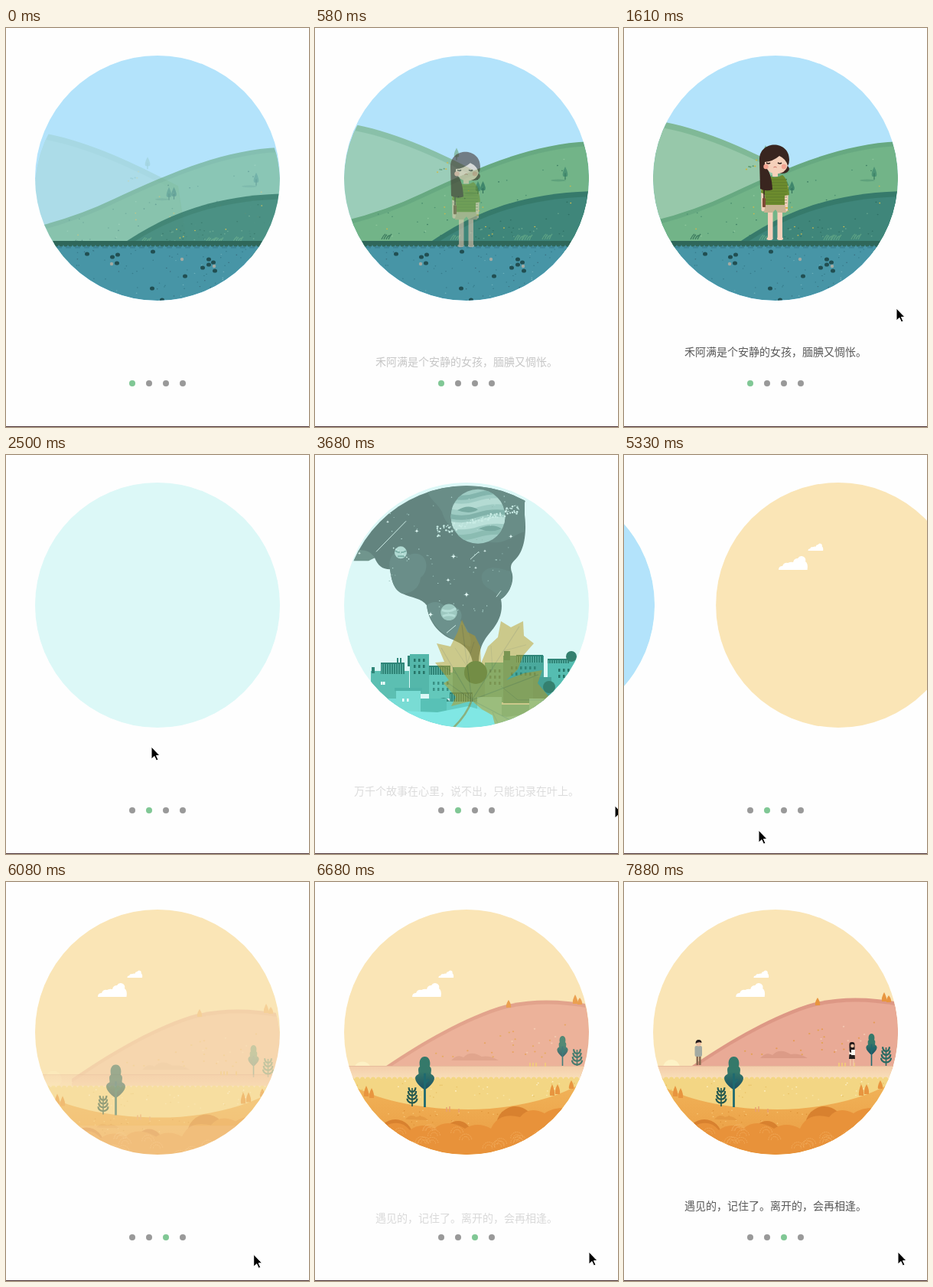
An HTML page that plays this animation: 396x521 px, repeating every 8000 ms.

```html
<!DOCTYPE html>
<html lang="zh">
<head>
<meta charset="utf-8">
<title>Onboarding</title>
<style>
html, body { margin: 0; width: 100%; height: 100%; overflow: hidden; background: #fefefe; }
svg { display: block; width: 396px; height: 521px; }
text { font: 14px "Noto Sans CJK SC", "Noto Sans CJK", sans-serif; fill: #585858; }
</style>
</head>
<body>
<svg id="stage" viewBox="0 0 396 521">
  <defs>
    <clipPath id="disc"><circle cx="198" cy="196" r="160"/></clipPath>
    <clipPath id="globe"><circle cx="213" cy="76" r="35.5"/></clipPath>
    <linearGradient id="crown" x1="0" y1="0" x2="0" y2="1">
      <stop offset=".45" stop-color="#35796a"/><stop offset="1" stop-color="#1b4f64"/>
    </linearGradient>
    <linearGradient id="sand" x1="0" y1="0" x2="0" y2="1">
      <stop offset="0" stop-color="#f3cdaa"/><stop offset="1" stop-color="#fae2bc"/>
    </linearGradient>
    <linearGradient id="soil" x1="0" y1="0" x2="0" y2="1">
      <stop offset="0" stop-color="#f2b65c"/><stop offset="1" stop-color="#e99a40"/>
    </linearGradient>
  </defs>
</svg>
<script>
const LOOP = 8000, GAP = 400;
const stage = document.getElementById('stage');
const clamp = v => Math.max(0, Math.min(1, v));
let seed = 7;
const rnd = () => (seed = seed * 16807 % 2147483647) / 2147483647;
const pick = list => list[Math.floor(rnd() * list.length)];

// Drawing helpers, each returns markup
const path = (d, fill, more = '') => `<path d="${d}" fill="${fill}" ${more}/>`;
const line = (d, color, w = 1, more = '') => path(d, 'none', `stroke="${color}" stroke-width="${w}" ${more}`);
const rect = (x, y, w, h, fill, r = 0) => `<rect x="${x}" y="${y}" width="${w}" height="${h}" rx="${r}" fill="${fill}"/>`;
const oval = (x, y, rx, ry, fill, more = '') => `<ellipse cx="${x}" cy="${y}" rx="${rx}" ry="${ry}" fill="${fill}" ${more}/>`;
const dot = (x, y, r, fill) => oval(x, y, r, r, fill);
const many = (n, fn) => Array.from({ length: n }, (_, i) => fn(i)).join('');
const each = (list, fn) => list.map(fn).join('');
const hill = (d, edge, body, dy) => path(d, edge) + path(d, body, `transform="translate(0 ${dy})"`);

function specks(n, x0, x1, top, bottom, colors, r = .8) {
  return many(n, () => {
    const x = x0 + rnd() * (x1 - x0), y0 = top(x);
    return oval(x.toFixed(1), (y0 + rnd() * (bottom - y0)).toFixed(1), r * 1.2, r, pick(colors));
  });
}
const pine = (x, y, h, c, trunk) =>
  path(`M${x} ${y - h}Q${x + 5} ${y - h * .4} ${x + 2.5} ${y - 4}H${x - 2.5}Q${x - 5} ${y - h * .4} ${x} ${y - h}Z`, c) +
  line(`M${x} ${y - h * .5}V${y}`, trunk, 1.2);
const grass = (x, y, c) => many(4, i => line(`M${x + i * 3 - 5} ${y + 5}q2 -5 ${5 - i % 2} ${-7 + i % 3}`, c, 1.4));
const flame = (x, y, h) => path(`M${x} ${y - h}q4 ${h * .6} 3 ${h}h-6q-1 ${-h * .4} 3 ${-h}Z`, '#e8953f');
const fern = (x, y, h, c) => line(`M${x} ${y}V${y - h}`, c, 1.6) +
  many(4, i => {
    const b = y - h * (.18 + i * .2), w = 6.5 - i * .7;
    return line(`M${x} ${b}q${-w} -1 ${-w} -6M${x} ${b}q${w} -1 ${w} -6`, c, 2.2);
  });
const leafTree = (x, y, h, w) => {
  const c = y - h, b = h * .66;
  return path(`M${x} ${c}C${x + w * .5} ${c} ${x + w * .55} ${c + b * .2} ${x + w * .45} ${c + b * .3}` +
    `C${x + w * .75} ${c + b * .35} ${x + w * .5} ${c + b * .5} ${x + w * .6} ${c + b * .53}` +
    `C${x + w * 1.25} ${c + b * .62} ${x + w * .7} ${c + b * .85} ${x} ${c + b}` +
    `C${x - w * .7} ${c + b * .85} ${x - w * 1.25} ${c + b * .62} ${x - w * .6} ${c + b * .53}` +
    `C${x - w * .5} ${c + b * .5} ${x - w * .75} ${c + b * .35} ${x - w * .45} ${c + b * .3}` +
    `C${x - w * .55} ${c + b * .2} ${x - w * .5} ${c} ${x} ${c}Z`, 'url(#crown)') +
    line(`M${x} ${y}V${c + b * .5}M${x} ${c + b * .8}l5 -5`, '#1f6a70', w * .2);
};
const star = (x, y, r) => path(`M${x} ${y - r}Q${x} ${y} ${x + r} ${y}Q${x} ${y} ${x} ${y + r}Q${x} ${y} ${x - r} ${y}Q${x} ${y} ${x} ${y - r}Z`, '#e4fbf6');

// Page 1: meadow
const meadowBack = () =>
  hill('M30 119Q44 120 54 123C110 134 165 160 225 191L240 290H30Z', '#80b997', '#97c8aa', 8) +
  pine(185, 169, 16, '#7fb59a', '#6ca287') +
  specks(6, 160, 176, () => 168, 186, ['#c9b63f', '#5e9a72'], 1);

const meadowMid = () =>
  hill('M30 254Q90 240 140 216C220 179 290 149 365 148V290H30Z', '#67a981', '#72b488', 6) +
  oval(204, 216, 9, 1.5, '#5fa27c') + oval(318, 199, 10, 1.5, '#5fa27c') +
  pine(213, 217, 17, '#468f72', '#35745e') + pine(219.5, 216, 16, '#3f866c', '#35745e') +
  pine(327, 198, 17, '#4c9475', '#387a60') +
  specks(55, 80, 350, x => 240 - (x - 60) * .28, 272, ['#4f9372', '#8dc79b', '#4f9372', '#c9b84f', '#3f7f64']) +
  grass(92, 271, '#3f7d60');

const meadowFront = () =>
  hill('M150 280C200 246 262 215 365 213V290H150Z', '#367a6b', '#3f867a', 7) +
  specks(40, 200, 335, x => 268 - (x - 190) * .3, 276, ['#2f7064', '#d0bd4e', '#65a58f', '#2f7064']) +
  each([[182, 272], [266, 272], [276, 272], [302, 271]], ([x, y]) => grass(x, y, '#5ba084'));

const pond = () =>
  rect(30, 282, 340, 80, '#4795a6') +
  rect(30, 278, 340, 5.5, '#2f675a') +
  many(56, i => dot(36 + i * 6, 283, 2.6, '#2f675a')) +
  line('M30 286.5H370', '#3d8394', 2, 'stroke-dasharray="7 5"') +
  specks(90, 60, 335, () => 289, 352, ['#367c8c', '#3a6f80', '#367c8c', '#6db0bb'], .7) +
  each([[106, 295], [192, 292], [139, 299], [146, 296], [145, 307], [234, 324], [191, 340], [265, 302],
    [271, 306], [265, 309], [257, 313], [273, 317], [204, 355]], ([x, y]) => oval(x, y, 3, 2.6, '#214f52')) +
  each([[138, 308], [272, 311], [230, 302]], ([x, y]) => dot(x, y, 2.2, '#a3aaa2'));

const SKIN = '#f5d0ba', HAIR = '#39251f';
const girl = () =>
  oval(207, 184, 9, 6, HAIR) +
  rect(188, 236, 6.5, 39, SKIN) + rect(200.5, 236, 6.5, 39, SKIN) +
  oval(190.5, 275, 4, 2, SKIN) + oval(204, 275, 4, 2, SKIN) +
  path('M179 206h6l.5 30q-3 6 -6 2Z', SKIN) + path('M209 206h6l-1 32q-3 4 -5 0Z', SKIN) +
  rect(209, 234, 5, 1.8, '#dcb13f') +
  path('M185 228h25l2 13h-11l-3 -4 -4 4h-11Z', '#c9b493') +
  path('M187 192Q197 198 207 192Q214 196 216 218L210 219 210 231H185L184 217 179 215Q180 198 187 192Z', '#6d8c2e') +
  many(9, i => line(`M182 ${198 + i * 3.8}H213`, '#58742a', 1, 'opacity=".6"')) +
  rect(194, 187, 7, 7, SKIN) +
  path('M183 170Q184 190 199 190.500Q215 190 215 171Q200 158 183 170Z', SKIN) +
  path('M177 172C177 146 216 146 216 172Q216 177 214 180Q212 171 203 167Q195 174 184 175L184 181Q193 188 194 211Q186 214 178 210Z', HAIR) +
  line('M186 176q3 2 5 0M201 176q3 2 5 0', '#2b1a16', 1.6) +
  dot(185.500, 181, 3.2, '#f2a391') + dot(209, 181, 3.2, '#f2a391') +
  line('M195.500 182q2 -1.500 4 0', '#c4665a', 1) +
  line('M183 210V222', HAIR, 1.5) + rect(181, 222, 4, 12, '#7c4a35', 1);

// Page 2: city under a starry plume
const plume = () =>
  path('M30 129C48 134 64 135 78 130C82 140 88 145 98 145C100 158 102 172 115 177C125 182 140 183 146 192' +
    'C148 212 160 228 178 236C195 243 205 250 207 274H214C213 252 218 240 230 226C242 212 246 198 243 184' +
    'C252 178 260 165 258 152C256 145 254 140 260 134C272 124 275 105 275 90C275 75 273 65 270 58L292 45V20H30Z', '#41645e') +
  path('M98 145C94 128 108 112 124 126C146 118 152 146 138 156C136 172 124 176 115 177C102 172 100 158 98 145Z', '#4a716a') +
  path('M150 20C136 48 160 56 166 70C172 92 196 110 222 108C246 116 262 98 274 96V58L285 30Z', '#496f68') +
  path('M146 192C156 184 168 188 172 198C184 188 196 200 190 212C200 222 206 236 203 246C180 238 150 224 146 192Z', '#4d756e') +
  path('M78 130C70 116 56 122 50 118V134H70Z', '#52796f') +
  path('M243 184C234 168 216 172 218 152C226 136 246 146 257 148C260 165 252 178 243 184Z', '#466c65') +
  `<g clip-path="url(#globe)">` + rect(170, 36, 90, 82, '#8dbfb4') +
  each([[48, 6, '#6aa398'], [60, 8, '#a9d3c9'], [74, 6, '#689f94'], [85, 9, '#b2dad1'], [100, 7, '#75ab9f']], ([y, w, c]) =>
    line(`M170 ${y}q22 7 42 0t48 -2`, c, w)) +
  path('M186 68q14 -9 27 -1q-10 7 -27 1ZM214 92q18 -8 30 0q-14 6 -30 0Z', '#5c9489') + '</g>' +
  many(120, () => {
    const a = rnd() * 2 - 1, s = (rnd() - .5) * (5 + Math.abs(a) * 9);
    return dot((213 + a * 54).toFixed(1), (81 - a * 15 + s).toFixed(1), (.5 + rnd() * .9).toFixed(1), '#c3e9e0');
  }) +
  dot(112, 123, 8, '#a5d2c8') + line('M105 121q7 4 14 0M108 128h9', '#629c91', 2) +
  line('M102 117q12 6 22 16', '#c3e9e0', 1.5, 'stroke-dasharray="1.5 2"') +
  dot(175, 201, 10.800, '#8bbbb0') + line('M166 198q9 4 18 -2M167 206q8 -3 16 0', '#a9d5cc', 3) +
  each([[95, 83], [133, 95], [181, 128], [222, 121], [174, 159], [151, 204], [210, 143], [256, 102], [198, 178], [58, 124]],
    ([x, y], i) => star(x, y, 2 + i % 3)) +
  specks(60, 95, 255, () => 45, 165, ['#a9d5cc', '#7fa9a0'], .6) +
  specks(12, 152, 236, () => 175, 222, ['#a9d5cc'], .6) +
  line('M80 122L119 82M203 132L214 122M172 228L184 218M237 181L243 173', '#c8e8e0', 1);

const block = ([x, y, w, h, c]) => rect(x, y, w, h, c);
const roof = ([x, y, w, h]) => rect(x, y, w, h, '#2f8578') +
  many(Math.floor(w / 3), i => rect(x + 1 + i * 3, y + 2, 1, h - 2, '#5fb9ab'));
const panes = ([x, y, cols, rows, c]) =>
  many(cols * rows, i => rect(x + i % cols * 6, y + Math.floor(i / cols) * 8, 2.5, 4, c));
const city = () =>
  each([[73, 282, 50, 45, '#5cbfb2'], [74, 277, 4, 8, '#2f8578'], [124, 260, 25, 52, '#54b7aa'], [121, 262, 3, 14, '#2f8578'],
    [107, 265, 2, 9, '#2f8578'], [111, 265, 2, 9, '#2f8578'], [149, 284, 33, 34, '#63c8bb'], [180, 277, 50, 50, '#4fb0a3'],
    [222, 271, 26, 52, '#58bdae'], [246, 262, 53, 62, '#4aa99d'], [247, 256, 8, 12, '#3a9185'], [304, 266, 46, 60, '#55bdb1'],
    [285, 290, 24, 50, '#45a196']], block) +
  each([[86, 271, 31, 15], [149, 275, 28, 12], [263, 261, 35, 10], [304, 266, 28, 6], [176, 310, 30, 13]], roof) +
  dot(335, 263, 7, '#34806f') + dot(306, 303, 8, '#34806f') + dot(210, 284, 15, '#2b8069') + dot(168, 326, 9, '#3b8e80') +
  each([[129, 266, 3, 3, '#277568'], [154, 296, 4, 2, '#3a9185'], [228, 280, 3, 3, '#3a9185'], [256, 276, 6, 2, '#2f8578'],
    [318, 279, 4, 2, '#277568'], [86, 296, 1, 1, '#f0fffd'], [89, 296, 1, 1, '#f0fffd']], panes) +
  each([[106, 307, 32, 50, '#79dcd4'], [138, 318, 34, 40, '#58c1b6'], [70, 318, 36, 40, '#76dcd7'], [172, 322, 40, 40, '#64cdc4'],
    [212, 316, 32, 40, '#7be0da'], [244, 326, 36, 30, '#64cdc4'], [280, 318, 44, 40, '#7fe4df']], block) +
  rect(104, 304, 36, 4, '#4fb3a8') +
  each([[114, 318, 2, 1, '#f0fffd'], [294, 326, 3, 1, '#eafffc']], panes) +
  path('M60 326L110 334L160 336L200 328L250 342L340 330V360H60Z', '#80e7e4');

const leaf = () =>
  path('M205 311L178 318L184 306L168 288L175 284L157 261L169 260L159 236L177 240L186 222L192 205L199 221L209 226L216 240' +
    'L217 262L226 240L239 228L243 207L256 215L272 207L273 226L286 236L272 252L265 270L250 284L273 275L297 271L291 288' +
    'L312 313L296 318L304 338L283 336L270 348L255 338L236 346L232 330L218 322Z', '#ba9a22') +
  line('M205 310Q197 334 171 355', '#957d1c', 2.6) +
  each(['M192 212', 'M165 242', 'M267 214', 'M292 277', 'M268 343', 'M174 288'], d => line(d + 'L205 310', '#957d1c', 1.1)) +
  line('M200 268l-17 -26M199 262l9 -28M232 271l-2 -32M246 246l30 -8M243 292l22 18l34 0M232 326l7 14M185 276l-22 -12', '#957d1c', .8);

// Page 3: autumn shore
const CLOUD = 'M0 19Q0 14 5 14 7 9 12 10 16 8 19 9 20 4 25 4 28 -1 33 2 36 4 35 8 39 11 37.500 19Z';
const sun = () => dot(62, 243, 11, '#fdf2c6');
const pinkHill = () =>
  hill('M86 242C130 212 185 178 240 160C280 148 325 150 365 158V246H86Z', '#dd9885', '#e9aa96', 5) +
  path('M178 230q8 -9 16 -4q9 -10 24 -1q10 -2 22 5Z', '#dc9b87') +
  specks(26, 155, 330, x => 228 - (x - 130) * .28, 226, ['#e59a55', '#e3a255', '#f3c6b0'], 1) +
  flame(253, 161, 10) + flame(340, 156, 12) + flame(346, 157, 9) +
  leafTree(323.500, 240, 42, 8) + fern(342.500, 240, 24, '#2a6a62');

const field = () =>
  rect(30, 240, 340, 20, 'url(#sand)') + rect(30, 257, 340, 50, '#f3d684') +
  many(50, i => dot(34 + i * 7, 257.500, 3, '#f3d684')) +
  line('M30 240.500H370', '#e7bd9d', 1) +
  specks(45, 50, 345, () => 260, 286, ['#f9e6a8', '#e9c469', '#fff1c8'], .8) +
  many(4, i => line(`M${281 + i * 4 + (i > 2 ? 8 : 0)} 241v-5`, '#f3cf78', 1.6));

const shore = () =>
  path('M30 254C70 284 135 297 200 297C265 297 330 280 368 250V360H30Z', 'url(#soil)') +
  each([[67, 280, 14], [74, 282, 13], [310, 279, 15], [317, 277, 13], [335, 270, 11]], a => flame(...a)) +
  specks(50, 90, 320, () => 298, 318, ['#f8c878', '#dd9036'], .7) +
  path('M118 310q7 -8 14 -3q9 -3 16 4Z', '#e59a43') +
  each([[105, 333, 23], [187, 329, 17], [262, 318, 25]], ([x, y, r]) => dot(x, y, r, '#d8812f')) +
  path('M60 324Q74 310 92 318Q112 309 124 324Q138 313 156 322Q172 308 196 322Q212 312 230 322Q240 300 268 307' +
    'Q280 292 300 302Q318 290 350 298V360H60Z', '#e8923a') +
  many(24, () => {
    const x = 90 + rnd() * 215, y = 324 + rnd() * 24;
    return line(`M${x - 8} ${y}a8 8 0 0 1 16 0M${x - 4.500} ${y}a4.500 4.500 0 0 1 9 0`, '#f3b264', .8, 'stroke-dasharray="1.500 1"');
  }) +
  line('M172 300v-6M176 300v-7M188 301v-5', '#e8a070', 1.5) +
  fern(127, 293, 24, '#24584f') + leafTree(143.500, 294, 66, 14);

const couple = () =>
  rect(94.500, 226, 2.6, 13, '#8b6a52') + rect(98, 226, 2.600, 13, '#8b6a52') +
  rect(92.500, 214, 9.500, 14, '#a3aaa2', 2) + dot(97.500, 211, 3.400, '#f0c3a4') +
  path('M93.500 211q0 -5 4 -5t4 4q-4 -2 -8 1Z', '#231c1c') +
  rect(295, 230, 1.800, 10, '#f0c3a4') + rect(299, 230, 1.800, 10, '#f0c3a4') +
  rect(294.500, 217, 7, 9, '#fbf7ef') + path('M294.500 225h7l.5 6h-8Z', '#26211f') +
  rect(294.500, 209, 7, 14, '#241c1c', 3) + dot(298.500, 214, 2.300, '#f0c3a4') + rect(297, 219, 5, 7, '#fbf7ef');

// [start, markup] per layer; every layer rises 20px and fades in over a second
const pages = [
  { sky: '#b3e3fb', leave: 1870, caption: '禾阿满是个安静的女孩，腼腆又惆怅。', x: 79, say: 250,
    layers: [[-240, meadowBack], [-610, meadowMid], [-830, meadowFront], [-1100, pond], [50, girl]] },
  { sky: '#dcf8f7', leave: 5010, caption: '万千个故事在心里，说不出，只能记录在叶上。', x: 51, say: 3330,
    layers: [[2750, plume], [2510, city], [3030, leaf]] },
  { sky: '#fae5b6', leave: 1e5, caption: '遇见的，记住了。离开的，会再相逢。', x: 79, say: 6460,
    layers: [[5800, sun], [5830, pinkHill], [5640, field], [5610, shore], [6720, couple]] }
];
const SWIPE = 585, RISE = 20;
const wrap = (inner, i) => `<g class="layer" data-p="${i}">${inner}</g>`;
const clip = inner => `<g clip-path="url(#disc)">${inner}</g>`;
const pageMarkup = pages.map((p, i) => `<g class="page">` +
  clip(rect(38, 36, 320, 320, p.sky) +
    (i < 2 ? `<circle class="fade" cx="198" cy="196" r="160" fill="#b3e3fb"/>` :
      path(CLOUD, '#fff', 'id="near"') + path(CLOUD, '#fff', 'id="far"')) +
    p.layers.map(([, draw]) => wrap(clip(draw()), i)).join('')) +
  wrap(`<text x="${p.x}" y="428">${p.caption}</text>`, i) + '</g>').join('');

stage.insertAdjacentHTML('beforeend', rect(0, 0, 396, 521, '#fefefe') + pageMarkup +
  many(4, i => `<circle class="dot" cx="${165 + i * 22}" cy="464" r="4"/>`) +
  rect(0, 520, 396, 1, '#4d3335') +
  path('M0 0V16L4 12.500L6.500 18L9 17L6.500 11.500H11Z', '#000', 'id="arrow" stroke="#fff" stroke-width="1"'));

const all = q => [...stage.querySelectorAll(q)];
const groups = all('.page'), fades = all('.fade'), dots = all('.dot'), layers = all('.layer');
const [near, far, arrow] = ['near', 'far', 'arrow'].map(id => document.getElementById(id));
const starts = pages.flatMap(p => [...p.layers.map(l => l[0]), p.say]);
const move = (el, x, y, more = '') => el.setAttribute('transform', `translate(${x} ${y})${more}`);

// Pointer keys: time, x, y
const route = [[1000, 400, 410], [1170, 383, 385], [1320, 380, 362], [1460, 366, 357], [1610, 356, 366], [1910, 340, 368],
  [2350, 190, 381], [2650, 190, 381], [3240, 370, 450], [3530, 392, 458], [3900, 392, 458], [4130, 385, 466],
  [4900, 330, 488], [5330, 176, 490], [5600, 172, 492], [6100, 330, 486], [6390, 358, 483]];
function pointer(t) {
  const n = route.findIndex(k => k[0] > t);
  if (n === 0) return [500, 0];
  if (n < 0) return route[route.length - 1].slice(1);
  const a = route[n - 1], b = route[n], f = (t - a[0]) / (b[0] - a[0]);
  return [a[1] + (b[1] - a[1]) * f, a[2] + (b[2] - a[2]) * f];
}

// The picture advances in held steps: first, last, count
const ticks = [0];
for (const [a, b, n] of [[140, 1170, 8], [1320, 1610, 3], [1910, 2940, 8], [3090, 4130, 8], [4280, 5180, 7],
  [5330, 6230, 7], [6380, 7280, 7], [7430, 7880, 4]])
  for (let i = 0; i < n; i++) ticks.push(a + (b - a) * i / (n - 1));
const hold = t => ticks.filter(k => k <= t + .5).pop();

function render(t) {
  const slide = pages.map(p => 1 - (1 - clamp((t - p.leave) / SWIPE)) ** 2);
  const gone = pages.map(p => clamp((t - p.leave) / 200));
  const scroll = GAP * (slide[0] + slide[1]);
  groups.forEach((g, i) => move(g, i * GAP - scroll, 0));
  fades.forEach((f, i) => f.setAttribute('opacity', gone[i]));
  layers.forEach((el, i) => {
    const p = clamp((t - starts[i]) / 1000);
    move(el, 0, (1 - p) * RISE);
    el.setAttribute('opacity', p * (1 - gone[el.dataset.p]));
  });
  const drift = Math.max(0, t - 6240) / 1000;
  move(near, 120 + drift * 16, 131);
  move(far, 158.500 + drift * 6.700, 115, ' scale(.52)');
  const active = slide.filter(s => s === 1).length;
  dots.forEach((d, i) => d.setAttribute('fill', i === active ? '#80c795' : '#999'));
  move(arrow, ...pointer(t));
}

let shown = -1;
function loop(now) {
  const t = hold(now % LOOP);
  if (t !== shown) render(shown = t);
  requestAnimationFrame(loop);
}
loop(0);
</script>
</body>
</html>
```
